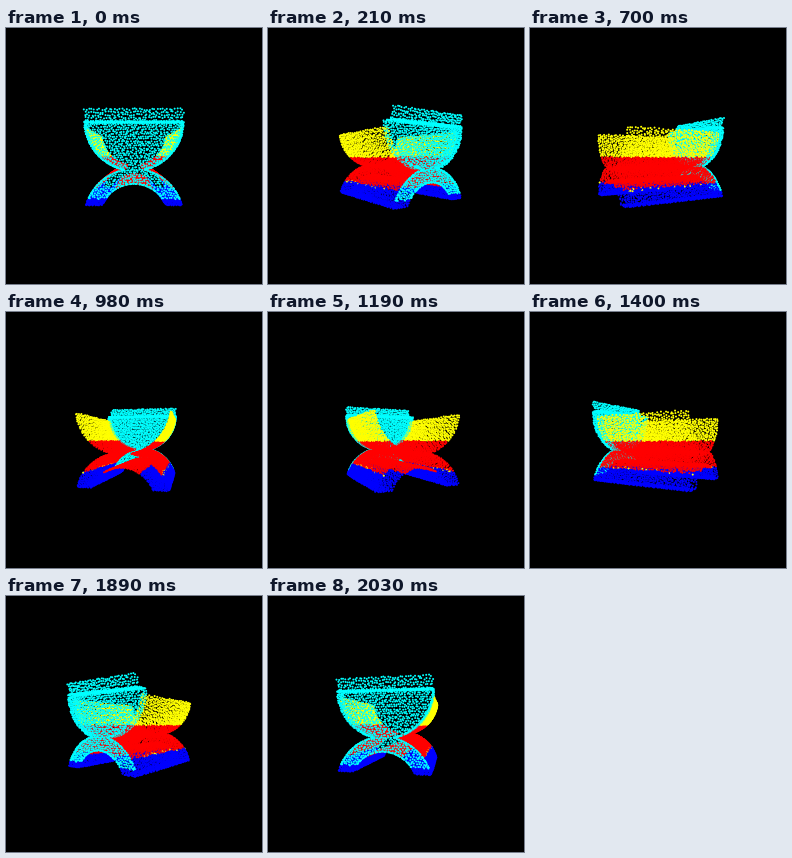
A matplotlib script that plays this animation: 256 px wide and 256 px high, repeating every 2100 ms.

```python
import numpy as np
import matplotlib.pyplot as plt
from matplotlib.animation import FuncAnimation

SIZE, FRAMES, INTERVAL = 256, 30, 70
CENTER = 128                   # screen point of the pivot, both axes
DIST = 235                     # camera distance
R, R_IN = 39.4, 27.5           # outer and inner radii of the profile
BOWL_Y, ARCH_Y = 27.6, -49.6   # centres of the two arcs
RIM, LEDGE, TOP, FOOT = 22.8, 27.5, 37.7, -39
BACK, BLOCK, LIP, EDGE, FRONT = -50, 37, 45, 48, 50
WAIST = np.arcsin(7.9 / R)
STEP = 2.1

CYAN, YELLOW, RED, BLUE = (0, 1, 1), (1, 1, 0), (1, 0, 0), (0, 0, 1)
rng = np.random.default_rng(4)


def grid(u0, u1, v0, v1, step=STEP):
    """Jittered, staggered grid over a rectangle."""
    nu = max(2, round((u1 - u0) / step))
    nv = max(2, round((v1 - v0) / step))
    i, j = np.meshgrid(np.arange(nu), np.arange(nv))
    i = i + 0.5 * (j % 2) + rng.uniform(-0.35, 0.35, i.shape)
    j = j + 0.5 + rng.uniform(-0.35, 0.35, j.shape)
    u = u0 + (u1 - u0) * np.clip((i + 0.25) / nu, 0, 1)
    v = v0 + (v1 - v0) * np.clip(j / nv, 0, 1)
    return u.ravel(), v.ravel()


def sheet(r, yc, up, a0, a1, z0, z1):
    """Both mirrored halves of an extruded arc; angles run from the waist."""
    parts = []
    for side in (-1, 1):
        s, z = grid(r * a0, r * a1, z0, z1)
        a = s / r
        parts.append(np.c_[side * r * np.sin(a), yc - up * r * np.cos(a), z])
    return np.vstack(parts)


def bowl(top, z0, z1):
    return sheet(R, BOWL_Y, 1, WAIST, np.arccos((BOWL_Y - top) / R), z0, z1)


def arch(r, z0, z1):
    start = WAIST if r == R else 0
    return sheet(r, ARCH_Y, -1, start, np.arccos((FOOT - ARCH_Y) / r), z0, z1)


def in_bowl(x, y):
    return x**2 + np.minimum(y - BOWL_Y, 0)**2 < R**2


def in_arch(x, y):
    r = np.hypot(x, y - ARCH_Y)
    return (r > R_IN) & (r < R)


def face(y0, y1, inside):
    x, y = grid(-R, R, y0, y1, 1.85)
    keep = inside(x, y)
    return np.c_[x, y, np.full(x.size, FRONT)][keep]


def ledge():
    x, z = grid(-R, R, BLOCK, FRONT)
    return np.c_[x, np.full(x.size, LEDGE), z]


def lip():
    x, y = grid(-R, R, LEDGE, TOP, 1.95)
    t = (y - LEDGE) / (TOP - LEDGE)
    return np.c_[x, y, LIP + 6 * t**0.6]


def feet():
    parts = []
    for side in (-1, 1):
        x, z = grid(25.5, 38, BACK, FRONT)
        parts.append(np.c_[side * x, np.full(x.size, FOOT), z])
    return np.vstack(parts)


def specks(n=22):
    y = rng.uniform(-28, -25, n)
    x = np.sqrt(R**2 - (y - ARCH_Y)**2) * rng.choice([-1, 1], n)
    return np.c_[x, y, rng.uniform(BACK, 30, n)]


def paint(points, bands):
    """Colour points by height; bands run from the lowest limit up."""
    rgb = np.tile(bands[0][1], (len(points), 1))
    for low, color in bands[1:]:
        rgb[points[:, 1] > low] = color
    return rgb


body = np.vstack([bowl(RIM, BACK, LIP), arch(R, BACK, EDGE),
                  arch(R_IN, BACK, EDGE), feet()])
block = np.vstack([bowl(LEDGE, BLOCK, FRONT), arch(R, EDGE, FRONT),
                   arch(R_IN, EDGE, FRONT), ledge(), lip(),
                   face(BOWL_Y - R, LEDGE, in_bowl),
                   face(FOOT, ARCH_Y + R, in_arch)])
dots = specks()

points = np.vstack([body, block, dots])
colors = np.vstack([paint(body, [(FOOT, BLUE), (-26.5, RED), (-1, YELLOW)]),
                    paint(block, [(FOOT, BLUE), (-34, CYAN)]),
                    paint(dots, [(FOOT, YELLOW)])])

fig = plt.figure(figsize=(SIZE / 100, SIZE / 100), dpi=100, facecolor="black")
ax = fig.add_axes([0, 0, 1, 1])
ax.set(xlim=(0, SIZE), ylim=(SIZE, 0))
ax.axis("off")
cloud = ax.scatter(points[:, 0], points[:, 1], s=(2.0 * 0.72)**2,
                   c=colors, linewidths=0)


def draw(i):
    a = 2 * np.pi * i / FRAMES
    x, y, z = points.T
    depth = z * np.cos(a) - x * np.sin(a)
    scale = DIST / (DIST - depth)
    px = CENTER + scale * (x * np.cos(a) + z * np.sin(a))
    py = CENTER - scale * y
    order = np.argsort(depth)
    cloud.set_offsets(np.c_[px, py][order])
    cloud.set_facecolors(colors[order])
    return cloud,


anim = FuncAnimation(fig, draw, frames=FRAMES, interval=INTERVAL,
                     repeat=True, repeat_delay=0)
plt.show()
```
